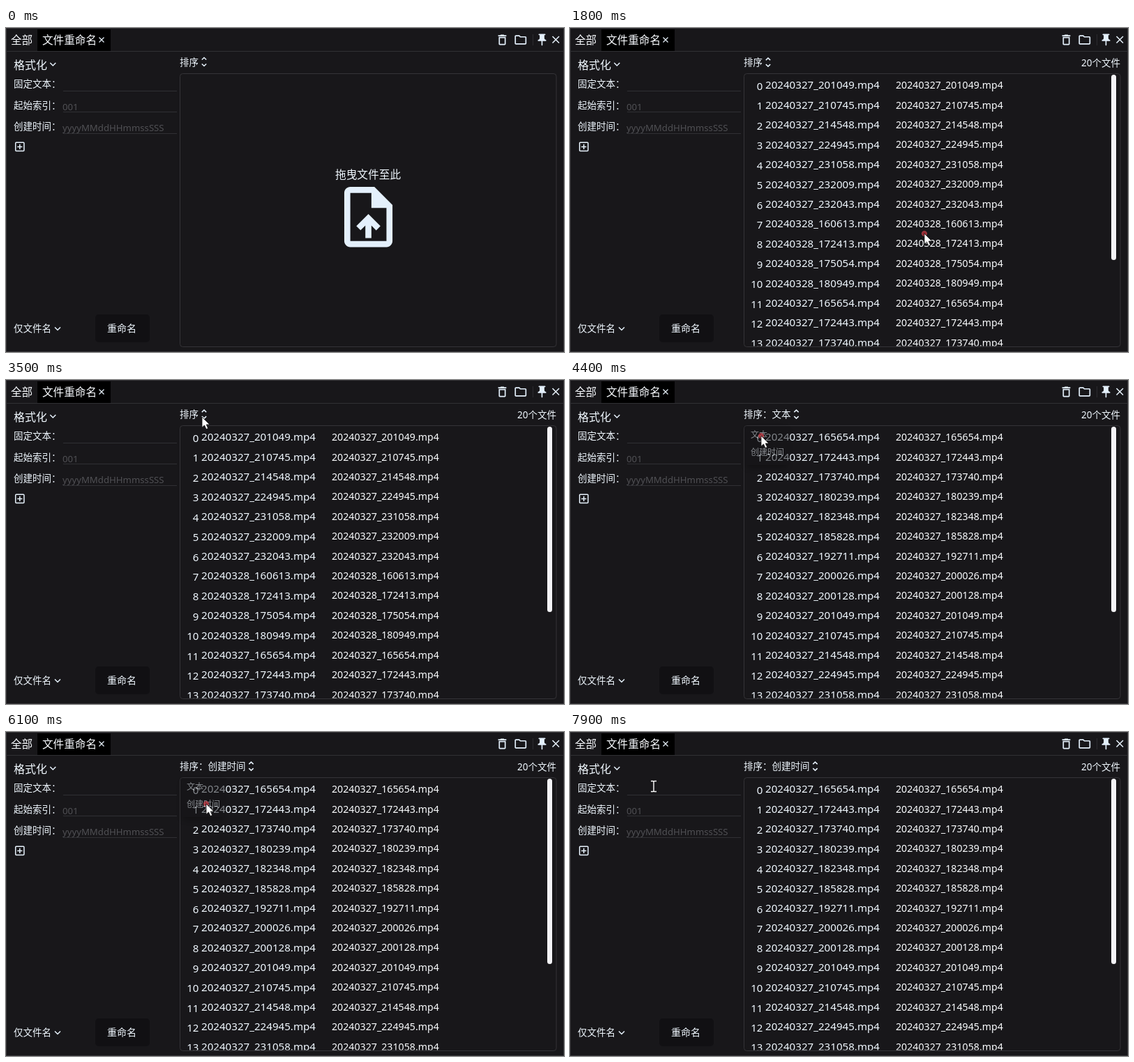
These frames come from a looping animation (800x465 px, 8 s). An HTML page:

```html
<!DOCTYPE html>
<html lang="zh-CN">
<head>
<meta charset="utf-8">
<title>文件重命名</title>
<style>
html, body { margin: 0; width: 100%; height: 100%; overflow: hidden; background: #18171a; }
svg { display: block; width: 800px; height: 465px; }
text { font-family: "Noto Sans", "Noto Sans CJK SC", "Noto Sans CJK", sans-serif; font-size: 13.5px; fill: #f0f8ff; white-space: pre; }
.tab { font-size: 15.6px; fill: #f8fbff; }
.hint { font-size: 13.2px; fill: #505054; }
.line { stroke: #343337; fill: none; }
.icon { fill: #e4f0fc; }
.stroke { fill: none; stroke: #e8f3fd; stroke-width: 1.5; }
.num { font-size: 15px; text-anchor: end; }
.old { font-size: 15.13px; }
.new { font-size: 14.2px; fill: #fbfdff; }
#menu text { font-size: 12px; }
</style>
</head>
<body>
<svg viewBox="0 0 800 465">
  <defs>
    <clipPath id="listClip"><rect x="250" y="67" width="538" height="389.5"/></clipPath>
    <linearGradient id="sky" x2="0" y2="1">
      <stop stop-color="#285f87"/><stop offset="1" stop-color="#467b9c"/>
    </linearGradient>
    <filter id="soft" x="-30%" y="-30%" width="160%" height="160%"><feGaussianBlur stdDeviation="4"/></filter>
  </defs>

  <rect width="800" height="465" fill="#18171a"/>
  <rect class="line" x=".5" y=".5" width="799" height="464"/>
  <path class="line" d="M0 33.5H800M82 90.5H245M82 120.5H245M82 151.5H245" style="stroke:#303034"/>

  <rect x="45" y="2" width="105" height="31" fill="#000"/>
  <text class="tab" x="7" y="22.6">全部</text>
  <text class="tab" x="52" y="22.6">文件重命名</text>
  <path class="stroke" d="M133.5 13.5l7 7m0-7l-7 7" style="stroke-width:1.2"/>

  <g class="icon">
    <path transform="translate(701.4 6.9) scale(.84)" d="M6 19c0 1.1.9 2 2 2h8c1.1 0 2-.9 2-2V7H6v12zM8 9h8v10H8V9zm7.5-5l-1-1h-5l-1 1H5v2h14V4z"/>
    <path transform="translate(727.7 6.9) scale(.84)" d="M9.17 6l2 2H20v10H4V6h5.17M10 4H4c-1.1 0-2 .9-2 2v12c0 1.1.9 2 2 2h16c1.1 0 2-.9 2-2V8c0-1.1-.9-2-2-2h-8l-2-2z"/>
    <path transform="translate(758.4 6.9) scale(.84)" d="M16 9V4h1c.55 0 1-.45 1-1s-.45-1-1-1H7c-.55 0-1 .45-1 1s.45 1 1 1h1v5c0 1.66-1.34 3-3 3v2h5.97v7l1 1 1-1v-7H19v-2c-1.66 0-3-1.34-3-3z"/>
  </g>
  <path class="line" d="M755.5 9V25" style="stroke:#2c2b2f"/>
  <path class="stroke" d="M783.5 12l9.5 9.5m0-9.5l-9.5 9.5"/>

  <text x="11" y="59.4" style="font-size:16px">格式化</text>
  <path class="stroke" d="M63.3 50l4 4 4-4"/>
  <text x="11" y="85">固定文本：</text>
  <text x="11" y="115.5">起始索引：</text>
  <text x="11" y="146">创建时间：</text>
  <text class="hint" x="81" y="117.8">001</text>
  <text class="hint" x="81" y="148">yyyyMMddHHmmssSSS</text>
  <path class="stroke" d="M14.7 164.2h10.2a1 1 0 0 1 1 1v10.2a1 1 0 0 1-1 1H14.7a1 1 0 0 1-1-1V165.2a1 1 0 0 1 1-1zM19.8 166.8v7.2m-3.6-3.6h7.2"/>
  <text x="11" y="436.3">仅文件名</text>
  <path class="stroke" d="M70 429.5l4 4 4-4"/>
  <rect x="128" y="411" width="78" height="40" rx="5" fill="#111013"/>
  <text x="145" y="435.6" style="font-size:14px">重命名</text>

  <g id="sort">
    <text id="label" x="249" y="53.5"></text>
    <path id="arrows" class="stroke" d="M-3.2 -3l3.2 -3 3.2 3M-3.2 3l3.2 3 3.2 -3"/>
  </g>
  <rect class="line" x="249.5" y="65.5" width="539.5" height="392" rx="4"/>

  <g id="base"><rect x="-53.5" y="-97" width="112.5" height="112" rx="3" fill="#4c565c"/></g>
  <g id="drop">
    <text x="472" y="215.6" style="font-size:15.7px">拖曳文件至此</text>
    <path class="icon" transform="translate(467.7 219.4) scale(4.32)" d="M14 2H6c-1.1 0-2 .9-2 2v16c0 1.1.9 2 2 2h12c1.1 0 2-.9 2-2V8l-6-6zm4 18H6V4h7v5h5v11zM8 15.01l1.41 1.41L11 14.84V19h2v-4.16l1.59 1.59L16 15.01 12.01 11 8 15.01z"/>
  </g>

  <g id="list">
    <text x="789" y="54.6" text-anchor="end">20个文件</text>
    <g id="rows" clip-path="url(#listClip)"></g>
    <rect x="776" y="67" width="7" height="266" rx="3.5" fill="#f3f3f6"/>
  </g>

  <g id="menu">
    <rect x="253" y="70" width="58" height="56" rx="4" fill="#000" opacity=".5" filter="url(#soft)"/>
    <rect x="250" y="66" width="65" height="56" rx="3" fill="#151417"/>
    <text x="259" y="82.8">文本</text>
    <text x="259" y="107.8">创建时间</text>
  </g>

  <g id="ghost">
    <g opacity=".88">
      <path d="M-49 -73H53V-6H46V11H-42V-6H-49Z" fill="#3d464c"/>
      <rect x="-42" y="-66" width="88" height="76" fill="#2b3035"/>
      <rect x="-32" y="-63" width="74" height="28" fill="url(#sky)"/>
      <path d="M2 -63h16l14 20-10-5-12-8z" fill="#7d8b90"/>
      <rect x="-32" y="-35" width="74" height="13" fill="#202327"/>
      <path d="M-32 8V-12l14-6 12 4 14-8 18 4 16-2V8z" fill="#565b5b"/>
      <g id="rocks" stroke-width="1.5"></g>
      <path d="M-34.5 -64V10" stroke="#a4a9ad" stroke-width="3" stroke-dasharray="4 3"/>
    </g>
    <rect x="33.5" y="-10.5" width="24.5" height="24.5" fill="#d2b52c"/>
    <rect x="-6.5" y="-51" width="21" height="20.5" fill="#0d69bb" stroke="#a9cdea"/>
    <text x="4" y="-36.2" text-anchor="middle" style="font-size:12.5px;font-weight:700;fill:#fff">20</text>
    <rect x="15" y="18.5" width="58" height="20" fill="#fff" stroke="#c4c4c6"/>
    <path d="M18 27.5h12m-5-5l5 5-5 5" fill="none" stroke="#17457f" stroke-width="1.2"/>
    <text x="34" y="33.2" style="font-size:12.6px;fill:#1d58a5">Move</text>
  </g>

  <circle id="ripple" fill="#c8323c" stroke="#e0505a"/>
  <path id="arrow" d="M0 0V15.2L3.5 12 6 17.6l2.7-1.2L6.3 11H11Z" fill="#fff" stroke="#111" stroke-width=".8"/>
  <path id="beam" d="M-4 -7.5h3q1 0 1 1 0-1 1-1h3M0 -6.5V6.5M-4 7.5h3q1 0 1-1 0 1 1 1h3" fill="none" stroke="#fff" stroke-width="1.4"/>
</svg>
<script>
const LOOP = 8000, STEP = 100;
const DRAG = 900, DROP = 1800, BY_TEXT = 4400, BY_DATE = 6100;
const $ = id => document.getElementById(id);
const show = (id, on) => { $(id).style.display = on ? '' : 'none'; };
const move = (id, x, y) => $(id).setAttribute('transform', `translate(${x} ${y})`);

function add(parent, tag, attrs, str = '') {
  const el = document.createElementNS('http://www.w3.org/2000/svg', tag);
  for (const key in attrs) el.setAttribute(key, attrs[key]);
  el.textContent = str;
  return $(parent).appendChild(el);
}

const clips = (day, times) => times.split(' ').map(s => `202403${day}_${s}.mp4`);
const names = [
  ...clips(27, '201049 210745 214548 224945 231058 232009 232043'),
  ...clips(28, '160613 172413 175054 180949'),
  ...clips(27, '165654 172443 173740 180239 182348 185828 192711 200026 200128')
];
const sorted = [...names].sort();

const rows = names.slice(0, 14).map((name, i) => {
  const y = 87.4 + i * 28.42;
  add('rows', 'text', { class: 'num', x: 276.3, y: y + 1.6 }, i);
  return [
    add('rows', 'text', { class: 'old', x: 280, y }),
    add('rows', 'text', { class: 'new', x: 467, y: y - .3 })
  ];
});

// Rough rock texture in the dragged thumbnail
let seed = 7;
const rand = () => (seed = seed * 16807 % 2147483647) / 2147483647;
for (let i = 0; i < 45; i++) {
  const x = -30 + rand() * 64, y = -14 + rand() * 18;
  const d = `M${x} ${y}l${2 + rand() * 6} ${rand() * 8 - 4}`;
  add('rocks', 'path', { d, stroke: rand() < .5 ? '#9a9e98' : '#34383a' });
}

// Pointer moves: from ms, to ms, end x, end y
const home = [692, 341];
const moves = [
  [DRAG, 1250, 507, 294], [1250, 1400, 508, 295],
  [1900, 2600, 415, 73], [2600, 2800, 281, 53],
  [2900, 3300, 257, 32], [3300, 3500, 281, 53],
  [3800, 4300, 274, 80], [4600, 5100, 309, 53],
  [5600, 6000, 287, 103], [6200, 6600, 679, 72],
  [6600, 7400, 85, 74], [7400, 7900, 120, 78]
];
const easeOut = k => 1 - (1 - k) ** 3;

function pointer(t) {
  let [x, y] = home;
  for (const [from, to, endX, endY] of moves) {
    if (t < from) break;
    const k = easeOut(Math.min(1, (t - from) / (to - from)));
    x += (endX - x) * k;
    y += (endY - y) * k;
  }
  return [x, y];
}

const clicks = [DROP, 3600, BY_TEXT, 5300, BY_DATE];
const menus = [[3600, BY_TEXT], [5300, BY_DATE]];

function menuAlpha(t) {
  const last = menus.filter(m => t >= m[0]).pop();
  if (!last) return 0;
  const [open, close] = last;
  return t < close
    ? Math.min(1, .8 + (t - open) / 1000)
    : Math.max(0, .5 - (t - close) / 400);
}

function drawRipple(t, x, y) {
  const hit = clicks.find(c => t >= c && t < c + 300);
  show('ripple', hit !== undefined);
  if (hit === undefined) return;
  const n = (t - hit) / STEP;
  move('ripple', x, y);
  $('ripple').setAttribute('r', 3.5 + n * 3);
  $('ripple').style.opacity = .7 - n * .25;
}

function draw(time) {
  const t = Math.floor(time / STEP) * STEP;
  const [x, y] = pointer(t);
  const active = t >= DRAG, loaded = t >= DROP, drag = active && !loaded;
  const overInput = active && x < 232;

  const label = t < BY_TEXT ? '排序' : t < BY_DATE ? '排序：文本' : '排序：创建时间';
  $('label').textContent = label;
  move('arrows', 257 + 13.5 * label.length, 48.5);
  move('sort', 0, loaded ? .6 : 0);

  const order = t < BY_TEXT ? names : sorted;
  rows.forEach((pair, i) => pair.forEach(el => { el.textContent = order[i]; }));
  show('drop', !loaded);
  show('list', loaded);
  $('menu').style.opacity = menuAlpha(t);

  show('base', drag);
  show('ghost', drag);
  show('arrow', active && !overInput);
  show('beam', overInput);
  for (const id of ['base', 'ghost', 'arrow', 'beam']) move(id, x, y);
  drawRipple(t, x, y);
}

const start = performance.now();
function tick() {
  draw((performance.now() - start) % LOOP);
  requestAnimationFrame(tick);
}
tick();
</script>
</body>
</html>
```
